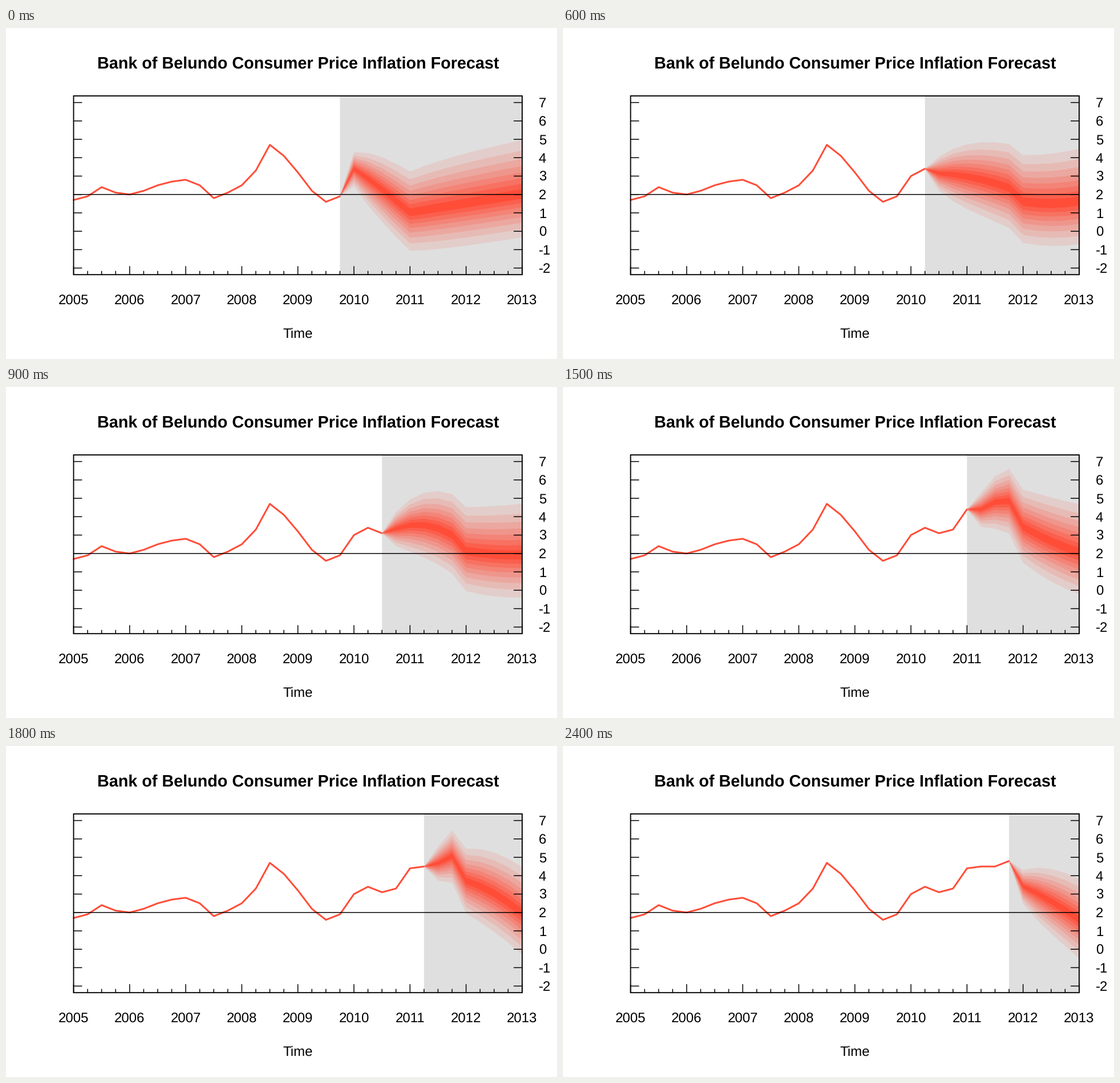
These frames come from a looping animation (966x580 px, 2700 ms). A matplotlib script:

```python
import matplotlib.pyplot as plt
import numpy as np
from matplotlib.animation import FuncAnimation
from matplotlib.patches import Polygon, Rectangle

W, H, DPI = 966, 580, 100
PX = 72 / DPI  # points per pixel
LEFT, RIGHT, TOP, BOTTOM = 118.5, 904.9, 119.0, 432.2
FIRST_YEAR, LAST_YEAR = 2005, 2013
Y_LOW, Y_HIGH = -2.36, 7.36
RED = np.array([255, 77, 56]) / 255
GREY = np.array([223, 223, 223]) / 255
BAND_COUNT = 8

# Quarterly inflation from 2005 Q1
HISTORY = np.array([
    1.7, 1.9, 2.4, 2.1, 2.0, 2.2, 2.5, 2.7, 2.8, 2.5, 1.8, 2.1, 2.5, 3.3,
    4.7, 4.1, 3.2, 2.2, 1.6, 1.9, 3.0, 3.4, 3.1, 3.3, 4.4, 4.5, 4.5, 4.8])
FIRST_ANCHOR = 19
LAST_QUARTER = 4 * (LAST_YEAR - FIRST_YEAR)

# Central path as two arcs (start, end, bow), before and after a sudden drop
FORECASTS = [
    ((3.4, 1.65, .05), (1.02, 2.0, 0)),
    ((3.38, 2.38, -.28), (1.75, 1.68, -.33)),
    ((3.15, 2.35, .15), (1.6, 1.62, -.12)),
    ((3.35, 3.0, .37), (2.12, 1.9, -.07)),
    ((4.12, 4.24, .3), (2.77, 2.06, -.18)),
    ((4.4, 4.85, .17), (3.45, 2.05, -.1)),
    ((4.68, 5.06, 0), (3.72, 1.94, .2)),
    ((4.85, 4.85, 0), (3.4, 1.45, .05)),
    ((4.8, 4.8, 0), (3.42, 1.6, .1)),
]


def to_x(year):
    return LEFT + (year - FIRST_YEAR) / (LAST_YEAR - FIRST_YEAR) * (RIGHT - LEFT)


def to_y(value):
    return BOTTOM - (value - Y_LOW) / (Y_HIGH - Y_LOW) * (BOTTOM - TOP)


def quarter_x(quarter):
    return to_x(FIRST_YEAR + quarter / 4)


def normal_quantile(p):
    return 4.91 * (p ** .14 - (1 - p) ** .14)


def arc(start, end, bow, count):
    t = np.linspace(0, 1, count)
    return start + (end - start) * t + 4 * bow * t * (1 - t)


def spread(ahead, limit, pace, power):
    """Uncertainty that grows with the quarters ahead and levels off."""
    return limit * (1 - np.exp(-(ahead / pace) ** power))


def central_path(step):
    anchor = FIRST_ANCHOR + step
    drop_year = 2011 if step < 2 else 2012
    drop = 4 * (drop_year - FIRST_YEAR)
    before, after = FORECASTS[step]
    return np.concatenate([[HISTORY[anchor]],
                           arc(*before, drop - anchor - 1),
                           arc(*after, LAST_QUARTER - drop + 1)])


plt.rcParams["text.hinting"] = "none"
fig = plt.figure(figsize=(W / DPI, H / DPI), dpi=DPI, facecolor="white")
ax = fig.add_axes([0, 0, 1, 1])
ax.set_xlim(0, W)
ax.set_ylim(H, 0)
ax.axis("off")


def stroke(xs, ys, width=1.5, color="black", **kw):
    return ax.plot(xs, ys, color=color, lw=width * PX, solid_capstyle="round",
                   solid_joinstyle="round", snap=False, **kw)[0]


def label(x, baseline, text, size=24, align="center", weight="normal"):
    ax.text(x, baseline, text, fontsize=size * PX, ha=align, va="baseline",
            family="Liberation Sans", weight=weight)


backdrop = ax.add_patch(Rectangle((LEFT, TOP), 1, BOTTOM - TOP, facecolor=GREY,
                                  lw=0, snap=False, zorder=1))
line = stroke([], [], 3, RED, zorder=2)
fan = []
outermost = normal_quantile(.9)
for k in reversed(range(BAND_COUNT)):
    scale = normal_quantile(.55 + .05 * k) / outermost
    shade = RED + (GREY - RED) * k / BAND_COUNT
    band = Polygon([(0, 0)], facecolor=shade, lw=0, snap=False, zorder=3)
    fan.append((scale, ax.add_patch(band)))

stroke([LEFT, RIGHT], [to_y(2)] * 2, zorder=4)
ax.add_patch(Rectangle((LEFT, TOP), RIGHT - LEFT, BOTTOM - TOP, fill=False,
                       ec="black", lw=1.9 * PX, snap=False, zorder=5))
for quarter in range(LAST_QUARTER + 1):
    x = quarter_x(quarter)
    major = quarter % 4 == 0
    stroke([x, x], [BOTTOM, BOTTOM - (14.4 if major else 6)], zorder=5)
    if major:
        label(x, 484.5, str(FIRST_YEAR + quarter // 4))
for value in range(-2, 8):
    y = to_y(value)
    stroke([LEFT, LEFT + 14.4], [y, y], zorder=5)
    stroke([RIGHT, RIGHT - 14.4], [y, y], zorder=5)
    label(933.8, y + 8.7, str(value), align="left")
label(512, 70.5, "Bank of Belundo Consumer Price Inflation Forecast", 28.8, weight="bold")
label(512, 542.5, "Time")


def update(step):
    anchor = FIRST_ANCHOR + step
    past = np.arange(anchor + 1)
    line.set_data(quarter_x(past), to_y(HISTORY[past]))
    backdrop.set_x(quarter_x(anchor))
    backdrop.set_width(RIGHT - quarter_x(anchor))

    centre = central_path(step)
    ahead = np.arange(len(centre))
    above = spread(ahead, 3.2, 4.0, .8)
    below = spread(ahead, 2.35, 2.1, .9)
    xs = quarter_x(anchor + ahead)
    for scale, band in fan:
        ys = np.concatenate([centre + scale * above, (centre - scale * below)[::-1]])
        band.set_xy(np.column_stack([np.concatenate([xs, xs[::-1]]), to_y(ys)]))
    return [line, backdrop] + [band for _, band in fan]


anim = FuncAnimation(fig, update, frames=len(FORECASTS), interval=300,
                     init_func=lambda: update(0), repeat=True, repeat_delay=0, blit=False)
plt.show()
```
